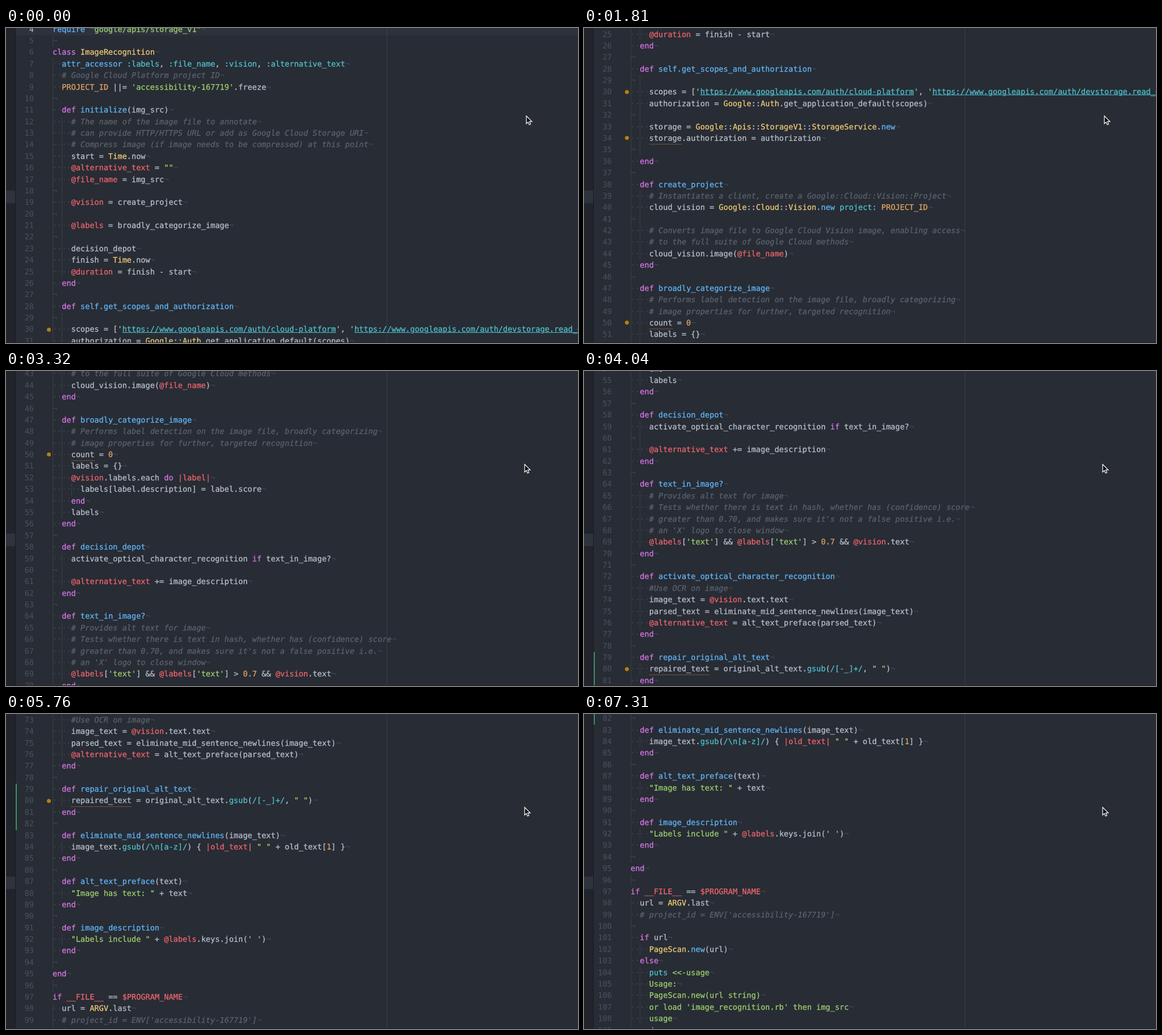
These frames come from a looping animation (1007 px wide and 556 px high, 8 s). An HTML page:

```html
<!DOCTYPE html>
<html lang="en">
<head>
<meta charset="utf-8">
<title>Code scroll</title>
<style>
  html, body { margin: 0; width: 100%; height: 100%; overflow: hidden; background: #282c34; }
  #stage {
    position: relative; width: 1007px; height: 556px; overflow: hidden;
    font: 13.59px/20.38px "DejaVu Sans Mono", monospace;
    text-rendering: geometricPrecision; font-variant-ligatures: none;
    color: #bbc2cf; white-space: pre;
  }
  #stage div, #stage svg, #stage b { position: absolute; }
  #code { left: 0; top: 0; width: 1007px; }
  .row { left: 82px; height: 20.38px; -webkit-text-stroke: .25px currentColor; }
  .row.current::before {
    content: ""; position: absolute; z-index: -1;
    left: -65px; width: 990px; height: 100%; background: #2d323c;
  }
  .num { left: -65px; width: 32px; text-align: right; color: #495162; font-weight: normal; }
  .num, .ws { -webkit-text-stroke: 0; }
  .current .num { color: #bbc2cf; }
  .guide { top: 0; width: 1px; height: 100%; background: #3b4049; }
  .dot { left: -10.5px; top: 6.3px; width: 7px; height: 7px; border-radius: 50%; background: #b5820f; }
  .lint { left: 4ch; top: 19.5px; border-top: 1px dotted #b58c2c; }
  .added { left: -65px; top: 0; width: 2px; height: 100%; background: #3a966c; }
  .ws { color: #434954; }
  .comment { color: #5c6370; font-style: italic; }
  .link { color: #4fc4d0; text-decoration: underline; text-decoration-thickness: 1px; }
  .str { color: #9fd272; }
  .vari { color: #f06670; }
  .digit { color: #e0a464; }
  .func { color: #61b8fc; }
  .sym { color: #4fc4d0; }
  .key { color: #d878ea; }
  .type { color: #f2cd78; }
  #wrap { left: 670px; top: 0; width: 1px; height: 556px; background: #3a3f49; }
  #tree { left: 0; top: 0; width: 16px; height: 556px; background: #21252b; border-right: 1px solid #181a1f; }
  #picked { left: 0; top: 287px; width: 16px; height: 22px; background: #2e333d; }
  #foot { left: 0; top: 555px; width: 1007px; height: 1px; background: #1e2127; }
  #mouse { left: 0; top: 0; overflow: visible; }
</style>
</head>
<body>
<div id="stage">
  <div id="tree"><div id="picked"></div></div>
  <div id="code"></div>
  <div id="wrap"></div>
  <div id="foot"></div>
  <svg id="mouse" width="12" height="18">
    <path d="M.6 .8V14.4L3.7 11.5L5.7 16.2L8.1 15.2L6.1 10.7H10.4Z" fill="#0c0d10" stroke="#fff" stroke-width="1.2"/>
  </svg>
</div>
<script>
const FIRST = 4, LINE = 20.38, TOP = -7.4, TICK = 46.6, LOOP = 8000;

const source = String.raw`require "google/apis/storage_v1"

class ImageRecognition
  attr_accessor :labels, :file_name, :vision, :alternative_text
  # Google Cloud Platform project ID
  PROJECT_ID ||= 'accessibility-167719'.freeze

  def initialize(img_src)
    # The name of the image file to annotate
    # can provide HTTP/HTTPS URL or add as Google Cloud Storage URI
    # Compress image (if image needs to be compressed) at this point
    start = Time.now
    @alternative_text = ""
    @file_name = img_src

    @vision = create_project

    @labels = broadly_categorize_image

    decision_depot
    finish = Time.now
    @duration = finish - start
  end

  def self.get_scopes_and_authorization

    scopes = ['https://www.googleapis.com/auth/cloud-platform', 'https://www.googleapis.com/auth/devstorage.read_only']
    authorization = Google::Auth.get_application_default(scopes)

    storage = Google::Apis::StorageV1::StorageService.new
    storage.authorization = authorization

  end

  def create_project
    # Instantiates a client, create a Google::Cloud::Vision::Project
    cloud_vision = Google::Cloud::Vision.new project: PROJECT_ID

    # Converts image file to Google Cloud Vision image, enabling access
    # to the full suite of Google Cloud methods
    cloud_vision.image(@file_name)
  end

  def broadly_categorize_image
    # Performs label detection on the image file, broadly categorizing
    # image properties for further, targeted recognition
    count = 0
    labels = {}
    @vision.labels.each do |label|
      labels[label.description] = label.score
    end
    labels
  end

  def decision_depot
    activate_optical_character_recognition if text_in_image?

    @alternative_text += image_description
  end

  def text_in_image?
    # Provides alt text for image
    # Tests whether there is text in hash, whether has (confidence) score
    # greater than 0.70, and makes sure it's not a false positive i.e.
    # an 'X' logo to close window
    @labels['text'] && @labels['text'] > 0.7 && @vision.text
  end

  def activate_optical_character_recognition
    #Use OCR on image
    image_text = @vision.text.text
    parsed_text = eliminate_mid_sentence_newlines(image_text)
    @alternative_text = alt_text_preface(parsed_text)
  end

  def repair_original_alt_text
    repaired_text = original_alt_text.gsub(/[-_]+/, " ")
  end

  def eliminate_mid_sentence_newlines(image_text)
    image_text.gsub(/\n[a-z]/) { |old_text| " " + old_text[1] }
  end

  def alt_text_preface(text)
    "Image has text: " + text
  end

  def image_description
    "Labels include " + @labels.keys.join(' ')
  end

end

if __FILE__ == $PROGRAM_NAME
  url = ARGV.last
  # project_id = ENV['accessibility-167719']

  if url
    PageScan.new(url)
  else
    puts <<-usage
    Usage:
    PageScan.new(url string)
    or load 'image_recognition.rb' then img_src
    usage
  end`.split("\n");

const rules = {
  comment: /#.*/,
  link: /(?<=')https[^']+/,
  str: /'(?!https|[,\]])[^']*'|"[^"]*"|<<-.*|'/,
  vari: /@\w+|\|\w+\||__FILE__|\$\w+/,
  digit: /PROJECT_ID|\b\d+(?:\.\d+)?/,
  func: /(?<=def )[\w.?]+|attr_accessor|require|\bnew\b/,
  sym: /(?<![:\w]):\w+|project:|\bgsub\b|\bputs\b|\/.+?\//,
  key: /\b(?:class|def|end|if|do|else)\b/,
  type: /\b[A-Z]\w+/
};
const lexer = new RegExp(
  Object.entries(rules).map(([name, re]) => `(?<${name}>${re.source})`).join("|"), "g");

const lint = { 30: "", 34: "storage", 50: "count", 80: "repaired_text" };

function add(parent, tag, cls, text = "") {
  const el = document.createElement(tag);
  el.className = cls;
  el.textContent = text;
  return parent.appendChild(el);
}

function highlight(row, text) {
  let at = 0;
  for (const m of text.matchAll(lexer)) {
    row.append(text.slice(at, m.index));
    add(row, "span", Object.keys(rules).find(k => m.groups[k] !== undefined), m[0]);
    at = m.index + m[0].length;
  }
  row.append(text.slice(at));
}

const indent = i => (source[i] || "").search(/\S|$/) / 2;
const code = document.getElementById("code");

source.forEach((line, i) => {
  const n = i + FIRST;
  const row = add(code, "div", n === FIRST ? "row current" : "row");
  row.style.top = TOP + i * LINE + "px";
  add(row, "b", "num", n);

  const depth = line ? indent(i) : Math.max(1, indent(i - 1), indent(i + 1));
  for (let d = 0; d < depth; d++) add(row, "b", "guide").style.left = d * 2 + "ch";

  add(row, "span", "ws", "·".repeat(indent(i) * 2));
  const body = line.trimStart();
  if (n > 104 && n < 109) add(row, "span", "str", body);
  else highlight(row, body);
  add(row, "span", "ws", "¬");

  if (n in lint) {
    add(row, "b", "dot");
    if (lint[n]) add(row, "b", "lint").style.width = lint[n].length + "ch";
  }
  if (n >= 79 && n <= 82) add(row, "b", "added");
});

// [time, wheel ticks scrolled so far]
const scroll = [
  [0, 0], [450, 1], [780, 3], [1190, 4], [1340, 6], [1670, 7], [1810, 9],
  [2230, 10], [2380, 12], [2680, 13], [2760, 14], [2910, 15], [3030, 16], [3320, 17],
  [3470, 18], [3590, 19], [3890, 20], [4040, 22], [4520, 23], [4630, 24], [4840, 26],
  [5140, 27], [5250, 28], [5640, 29], [5760, 30], [6230, 31], [6350, 32], [6740, 33], [7310, 34]
];
const pointer = [[0, 915.5, 154.5], [2530, 913.5, 160], [2680, 912.5, 164]];

const mouse = document.getElementById("mouse");
const latest = (steps, t) => steps.findLast(s => s[0] <= t);

function draw(now) {
  const t = now % LOOP;
  const [, x, y] = latest(pointer, t);
  code.style.transform = `translateY(${-latest(scroll, t)[1] * TICK}px)`;
  mouse.style.transform = `translate(${x}px, ${y}px)`;
}

const start = performance.now();
function tick() {
  draw(performance.now() - start);
  requestAnimationFrame(tick);
}
tick();
</script>
</body>
</html>
```
